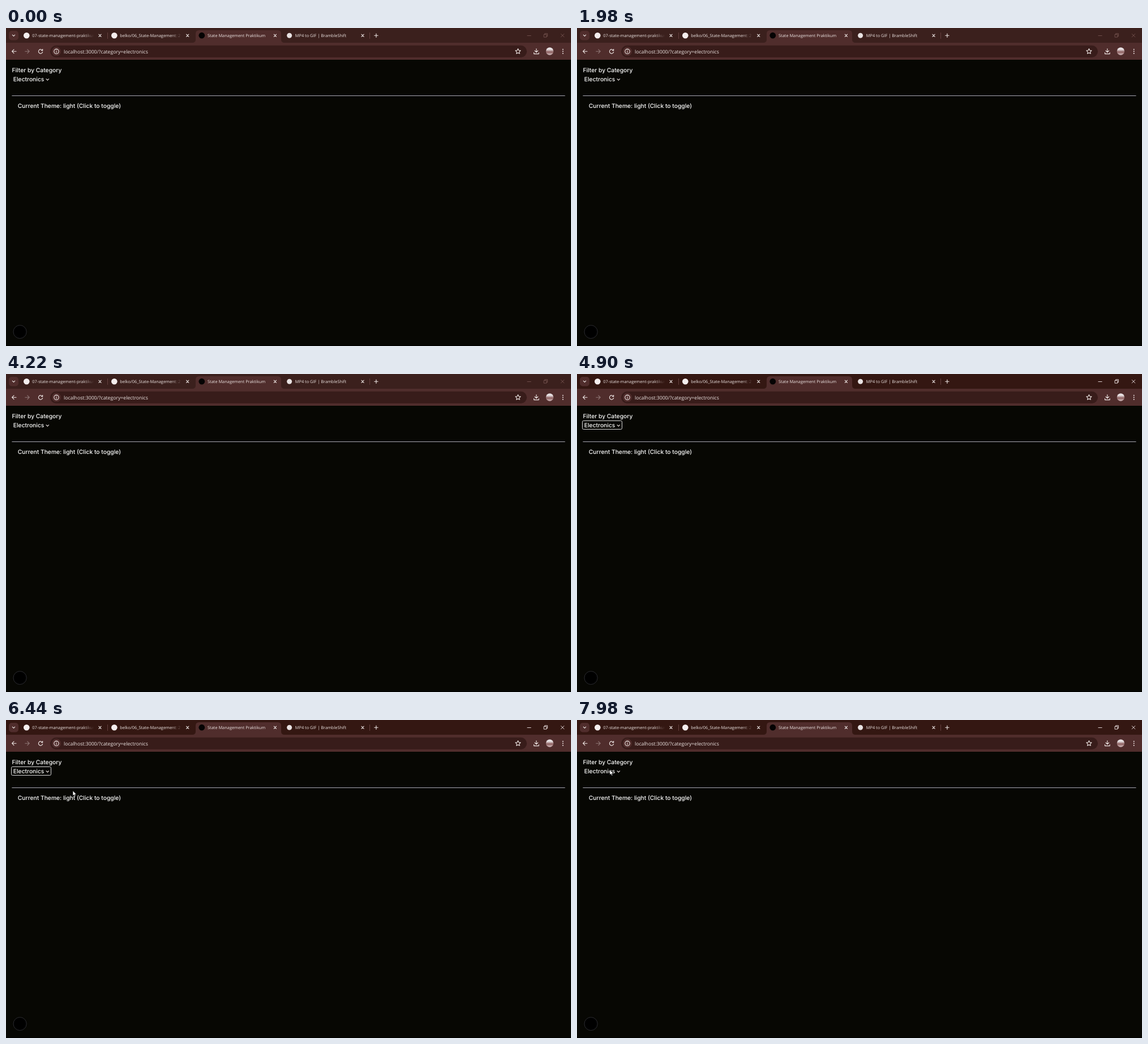
Recreate the animation shown at these times as an HTML page. Size 998x561 px, loop 8 s.

```html
<!DOCTYPE html>
<html lang="en">
<head>
<meta charset="utf-8">
<title>State Management Praktikum</title>
<style>
  html, body { margin: 0; width: 100%; height: 100%; overflow: hidden; background: #070703; }
  svg { display: block; width: 100%; height: 100%; }
  text { text-rendering: geometricPrecision; white-space: pre; }
  .tab { font: 7.4px "Open Sans", "Noto Sans", sans-serif; fill: #ebe2e0; }
  .url { font: 8.7px "Open Sans", "Noto Sans", sans-serif; fill: #eee6e4; }
  .page { font: 500 10.3px Inter, sans-serif; fill: #fff; }
  .icon { fill: none; stroke: #f0e8e6; stroke-width: 1.1; stroke-linecap: round; stroke-linejoin: round; }
</style>
</head>
<body>
<svg id="stage" viewBox="0 0 998 561" preserveAspectRatio="none">
  <defs>
    <linearGradient id="fadeInk">
      <stop offset="0.82" stop-color="#fff"/>
      <stop offset="1" stop-color="#000"/>
    </linearGradient>
    <mask id="fadeA" maskUnits="userSpaceOnUse" x="46" y="4" width="110" height="20">
      <rect x="46" y="4" width="110" height="20" fill="url(#fadeInk)"/>
    </mask>
    <mask id="fadeB" maskUnits="userSpaceOnUse" x="201" y="4" width="110" height="20">
      <rect x="201" y="4" width="110" height="20" fill="url(#fadeInk)"/>
    </mask>
    <linearGradient id="photo" x2="0" y2="1">
      <stop offset="0.25" stop-color="#e9e2e4"/>
      <stop offset="0.6" stop-color="#8c5f5f"/>
      <stop offset="1" stop-color="#d9c3c4"/>
    </linearGradient>
  </defs>

  <rect id="strip" width="998" height="27"/>
  <path fill="#502d2c" d="M0 26H329Q335 26 335 20V10Q335 4 341 4H480Q486 4 486 10V20Q486 26 492 26H998V56H0Z"/>
  <rect x="5" y="5" width="17" height="16.5" rx="5" fill="#502d2c"/>
  <path class="icon" d="M11.3 12.2l2.2 2.2 2.2-2.2"/>
  <path stroke="#65403f" d="M179.5 8V19M642.5 8V19"/>

  <circle cx="36.3" cy="13.2" r="5.3" fill="#f4eeee"/>
  <circle cx="191.3" cy="13.2" r="5.3" fill="#f4eeee"/>
  <circle cx="345.8" cy="13.2" r="5.4" fill="#050303"/>
  <circle cx="500.6" cy="13.2" r="4.5" fill="#e8e2e2"/>
  <text class="tab" x="46.3" y="16" mask="url(#fadeA)">07-state-management-praktikum</text>
  <text class="tab" x="201.3" y="16" mask="url(#fadeB)">belko/06_State-Management: 2</text>
  <text class="tab" x="356" y="16">State Management Praktikum</text>
  <text class="tab" x="510.8" y="16">MP4 to GIF | BrambleShift</text>
  <g id="closers" class="icon"></g>
  <path class="icon" d="M650.7 13.2h6.4M653.9 10v6.4"/>
  <g id="controls" fill="none" stroke-width=".9">
    <path d="M920.5 13.5h7"/>
    <path d="M950 11.4h4.8v4.8h-4.8zM951.6 11.4V9.8h4.8v4.8h-1.6"/>
    <path d="M980 10.2l6 6m0-6l-6 6"/>
  </g>

  <rect x="78" y="30.8" width="842" height="21" rx="10.5" fill="#381c1a"/>
  <circle cx="89" cy="41.3" r="8" fill="#502d2c"/>
  <circle class="icon" cx="89" cy="41.3" r="4.2"/>
  <path class="icon" d="M89 41v2.2M89 39.1v.1"/>
  <path class="icon" d="M18 41.2h-7.4M14 37.8l-3.4 3.4 3.4 3.4"/>
  <path class="icon" opacity=".4" d="M33.8 41.2h7.4M37.8 37.8l3.4 3.4-3.4 3.4"/>
  <path class="icon" d="M64.3 39.5A3.7 3.7 0 1 0 64.7 42.2M64.7 37.4v2.4h-2.5"/>
  <text class="url" x="102" y="44.5">localhost:3000/?category=electronics</text>
  <path id="star" class="icon"/>
  <path class="icon" d="M936.8 36.5v6M934 40l2.8 2.8 2.8-2.8M932.5 43.3v2.3h8.6v-2.3"/>
  <circle cx="960.4" cy="41" r="6.7" fill="url(#photo)"/>
  <path d="M983.7 37.6v.1M983.7 41.2v.1M983.7 44.8v.1" stroke="#f0e6e6" stroke-width="1.9" stroke-linecap="round"/>

  <rect y="56" width="998" height="505" fill="#070703"/>
  <path d="M0 560.5H998" stroke="#000"/>
  <text class="page" x="10.4" y="78">Filter by Category</text>
  <text class="page" x="12.8" y="94">Electronics</text>
  <path class="icon" d="M71 89.9l2.3 2.3 2.3-2.3"/>
  <rect id="ring" x="9.5" y="82.5" width="70" height="15" rx="2" fill="none" stroke="#dcdcdc"/>
  <path d="M10.4 119.5H987.5" stroke="#a9a8b4"/>
  <text class="page" x="20.8" y="141.4">Current Theme: light (Click to toggle)</text>
  <circle cx="24.6" cy="536" r="11.6" fill="#000" stroke="#2b2b2f"/>
  <path id="cursor" d="M0 0V8.8L2 7 3.4 10.2 4.9 9.5 3.5 6.4H6.3Z" fill="#fff" stroke="#000" stroke-width=".6"/>
</svg>
<script>
const LOOP = 8000, FOCUS = 4890, ENTER = 5420, PRESS = 7940;
// Pointer moves: start, end, from, to
const moves = [
  { t0: ENTER, t1: 5740, from: [420, 523], to: [260, 212] },
  { t0: 6160, t1: 6600, from: [260, 212], to: [58, 88] }
];
const el = id => document.getElementById(id);

el("closers").innerHTML = [166, 320.7, 475.4, 630]
  .map(x => `<path d="M${x - 2.1} 11.1l4.2 4.2m0-4.2l-4.2 4.2"/>`).join("");

el("star").setAttribute("d", "M" + Array.from({ length: 10 }, (_, i) => {
  const r = i % 2 ? 2.3 : 4.8, a = (i / 5 - 0.5) * Math.PI;
  return `${904.4 + r * Math.cos(a)} ${41.4 + r * Math.sin(a)}`;
}).join("L") + "Z");

function pointerAt(t) {
  const { t0, t1, from, to } = moves.findLast(m => t >= m.t0);
  const u = Math.min(1, (t - t0) / (t1 - t0));
  const k = u * u * (3 - 2 * u);
  return from.map((a, i) => a + (to[i] - a) * k);
}

const show = (id, on) => el(id).setAttribute("visibility", on ? "visible" : "hidden");

function draw(t) {
  const active = t >= FOCUS;
  el("strip").setAttribute("fill", active ? "#341712" : "#3b201d");
  el("controls").setAttribute("stroke", active ? "#f0e6e6" : "#755350");
  show("ring", active && t < PRESS);
  show("cursor", t >= ENTER);
  if (t >= ENTER) el("cursor").setAttribute("transform", `translate(${pointerAt(t)})`);
}

const start = performance.now();
function tick() {
  draw((performance.now() - start) % LOOP);
  requestAnimationFrame(tick);
}
tick();
</script>
</body>
</html>
```
